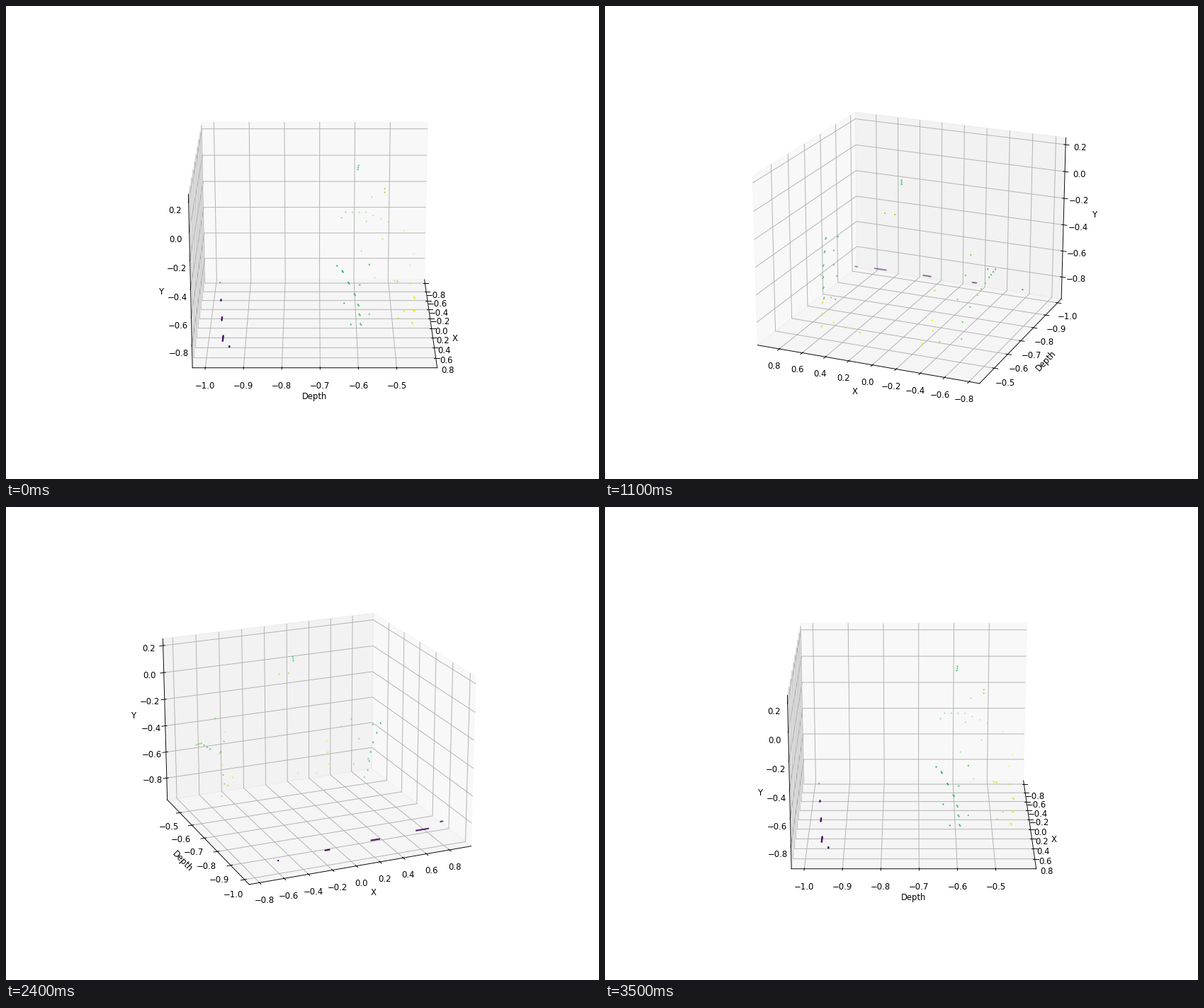
A matplotlib script that plays this animation: 837x669 px, repeating every 3600 ms.

```python
import numpy as np
import matplotlib.pyplot as plt
from matplotlib.animation import FuncAnimation

WIDTH, HEIGHT, DPI = 837, 669, 83.7
FRAMES, INTERVAL = 36, 100
TWIN = np.array([.002, .002, -.008])


def trail(n, *keys, twin=False):
    """n evenly spaced (x, depth, y) points along the path through keys."""
    t = np.linspace(0, len(keys) - 1, n)
    path = np.column_stack([np.interp(t, range(len(keys)), axis)
                            for axis in zip(*keys)])
    return np.vstack([path, path + TWIN]) if twin else path


def ground_row():
    """Streaks on the floor that grow longer with x."""
    streaks = []
    for k in range(4):
        x, depth, y = -.59 + .42 * k, -.985 + .009 * k, -.892 + .006 * k
        half = .0175 * k
        streaks.append(trail(4 * k + 1, (x - half, depth, y),
                             (x + half, depth, y)))
    streaks.append(trail(3, (.86, -.938, -.861), (.878, -.938, -.861)))
    return np.vstack(streaks)


points = np.vstack([
    # centre
    trail(3, (.010, -.596, .172), (.011, -.598, .143)),
    trail(2, (-.026, -.524, -.008), (.059, -.525, -.009)),
    # negative x side
    trail(7, (-.742, -.626, -.395), (-.755, -.568, -.40), (-.734, -.504, -.469)),
    trail(2, (-.665, -.638, -.415), (-.561, -.568, -.410)),
    trail(2, (-.620, -.553, -.244), (-.587, -.581, -.647)),
    trail(3, (-.550, -.522, -.542), (-.552, -.558, -.740), (-.562, -.543, -.847)),
    trail(3, (-.433, -.464, -.441), (-.447, -.435, -.624), (-.442, -.445, -.710)),
    trail(2, (-.354, -.446, -.815), (-.446, -.488, -.828), twin=True),
    # positive x side
    trail(6, (.730, -.642, -.365), (.705, -.602, -.58), (.685, -.593, -.762),
          twin=True),
    trail(3, (.642, -.655, -.358), (.630, -.636, -.632), (.621, -.618, -.790)),
    trail(3, (.562, -.570, -.376), (.599, -.595, -.510), (.589, -.569, -.727)),
    trail(3, (.494, -.449, -.634), (.510, -.454, -.814), twin=True),
    trail(2, (.569, -.495, -.494), (.353, -.488, -.839)),
    trail(2, (.396, -.445, -.766), (.205, -.470, -.838)),
    ground_row(),
])
x, depth, y = points.T

fig = plt.figure(figsize=(WIDTH / DPI, HEIGHT / DPI), dpi=DPI)
ax = fig.add_subplot(projection="3d")
ax.scatter(x, depth, y, c=depth, cmap="viridis", s=1)

ax.set(xlabel="X", ylabel="Depth", zlabel="Y")
ax.set_xticks(np.arange(-4, 5) / 5)
ax.set_yticks(np.arange(-10, -4) / 10)
ax.set_zticks(np.arange(-4, 2) / 5)
ax.set_xlim(-.884, .992)
ax.set_ylim(-1.0335, -.394)
ax.set_zlim(-.969, .251)


def update(i):
    # The tiny offset keeps the side pane on the left when seen head-on.
    azim = 360 * i / (FRAMES - 1) % 360 + 1e-3
    ax.view_init(elev=20, azim=azim)
    return []


anim = FuncAnimation(fig, update, frames=FRAMES, interval=INTERVAL,
                     repeat=True, repeat_delay=0)
plt.show()
```
